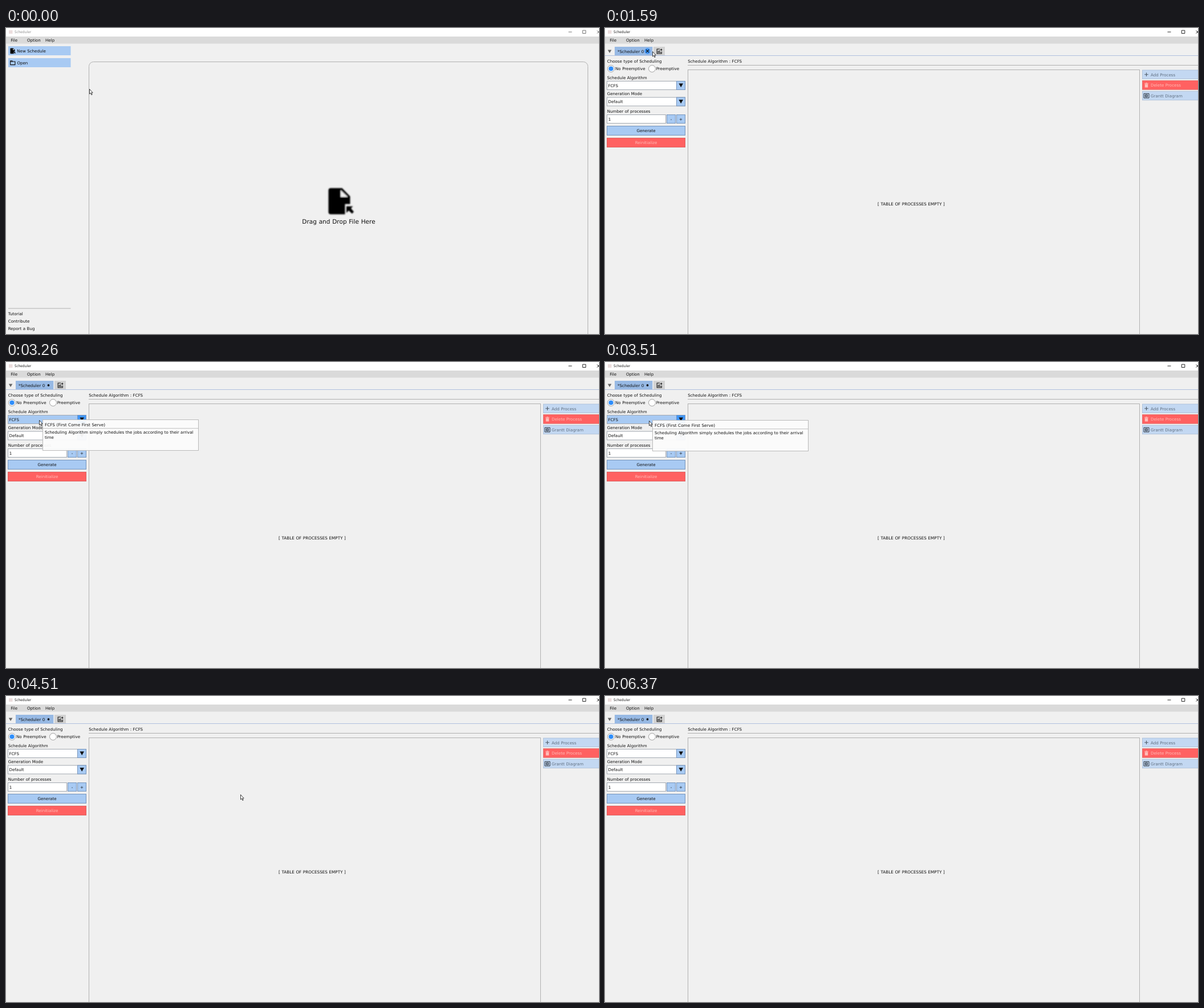
Animation, 1040 px wide and 538 px high, one loop 7.36 s. Source, as an HTML page:

```html
<!DOCTYPE html>
<html lang="en">
<head>
<meta charset="utf-8">
<title>Scheduler</title>
<style>
html, body { margin: 0; width: 100%; height: 100%; overflow: hidden; background: #f0f0f0; }
svg { display: block; width: 1040px; height: 538px; }
text { font-family: "DejaVu Sans", sans-serif; font-size: 7.12px; word-spacing: .034em; text-rendering: geometricPrecision; white-space: pre; }
.title { font-family: "Open Sans", sans-serif; font-size: 6.3px; }
.mid { text-anchor: middle; }
.caps { font-size: 7.25px; }
.note { font-size: 7.05px; }
.big { font-size: 10.55px; }
</style>
</head>
<body>
<svg id="stage" viewBox="0 0 1040 538" xmlns="http://www.w3.org/2000/svg">
  <defs>
    <g id="file">
      <path d="M4 0H24L38 14.5V28H29V46H4Q0 46 0 42V4Q0 0 4 0Z"/>
      <path d="M21.5 3.5V15.5H34Z" fill="#f0f0f0"/>
      <path d="M31.5 32H43L39.5 35.5L44.5 41.5L41.5 45L35.5 39.5L31.5 43.5Z"/>
    </g>
    <filter id="soft"><feGaussianBlur stdDeviation=".8"/></filter>
  </defs>
</svg>
<script>
const LOOP = 7360;
const INK = "#111", BLUE = "#a8caf3", HOT = "#4097fb", EDGE = "#7796bd", RED = "#ff6161", RED_EDGE = "#e06060";
const ROSE = "#ffbdb8", PALE = "#c3d8f2", PALE_EDGE = "#a9bcd4", SLATE = "#617082", LINE = "#b0b0b0", BOX = "#a2a8b0";
const stage = document.getElementById("stage");

function add(parent, tag, attrs, content) {
  const el = document.createElementNS("http://www.w3.org/2000/svg", tag);
  for (const key in attrs) el.setAttribute(key, attrs[key]);
  if (content) el.textContent = content;
  parent.append(el);
  return el;
}
const group = parent => add(parent, "g", {});
const rect = (p, x, y, width, height, fill, stroke = "none", extra = {}) =>
  add(p, "rect", { x, y, width, height, fill, stroke, ...extra });
const path = (p, d, fill = "none", stroke = "none", width = 1) =>
  add(p, "path", { d, fill, stroke, "stroke-width": width });
const text = (p, x, y, str, fill = INK, style = "") => add(p, "text", { x, y, fill, class: style }, str);
const circle = (p, cx, cy, r, fill, stroke = "none", width = 1) =>
  add(p, "circle", { cx, cy, r, fill, stroke, "stroke-width": width });
const fileIcon = (p, transform, extra = {}) => add(p, "use", { href: "#file", transform, ...extra });
const show = (el, on) => el.setAttribute("visibility", on ? "visible" : "hidden");
const move = (el, x, y) => el.setAttribute("transform", `translate(${x} ${y})`);

// Window frame
rect(stage, 0, 0, 1040, 538, "#f0f0f0");
rect(stage, 0, 0, 1040, 15, "#fff");
rect(stage, 0, 15, 1040, 12.5, "#dadada");
rect(stage, 5, 4, 6.5, 6, "#ecdede");
const title = text(stage, 15, 9.2, "Scheduler", "#888", "title");
const controls = path(stage, "M986.5 7H992.5M1011.3 4.2H1016.8V9.5H1011.3ZM1036.5 4.5L1041.5 9.5M1036.5 9.5L1041.5 4.5", "none", "#888", .9);
text(stage, 8.2, 24.2, "File");
text(stage, 37, 24.2, "Option");
text(stage, 69, 24.2, "Help");

// Start page
const home = group(stage);
const newButton = rect(home, 4, 32, 109.5, 16, BLUE);
fileIcon(home, "translate(7.5 35.5) scale(.21)");
text(home, 19.2, 43, "New Schedule");
rect(home, 4, 53, 109.5, 16, BLUE);
path(home, "M7.7 57.7H10.8L12 59H15.9V64.6H7.7ZM7.7 59H15.9", "none", INK, 1.1);
text(home, 19.4, 63.8, "Open");
path(home, "M4 493H113.5", "none", LINE);
["Tutorial", "Contribute", "Report a Bug"].forEach((s, i) => text(home, 3.7, 504.8 + 13.1 * i, s));
rect(home, 145.5, 59.5, 875, 520, "none", LINE, { rx: 8 });
fileIcon(home, "translate(565.5 281.5)", { filter: "url(#soft)" });
text(home, 583.5, 343.5, "Drag and Drop File Here", INK, "mid big");

// Scheduler page
const page = group(stage);
path(page, "M4.8 38.4H11.4L8.1 44Z", "#666");
rect(page, 17, 33, 66.3, 15.5, "#97b9e4");
rect(page, 85, 33, 20, 15.5, "#d2d2d2");
path(page, "M0 48.5H1040", "none", "#b0c0de");
text(page, 22, 43.6, "*Scheduler 0");
path(page, "M96 37H91.2V45H99.2V41.5M93.3 40.5V43.7M95.2 39.2V43.7M97.1 41.8V43.7M96.8 38.3H100.4M98.6 36.5V40.1", "none", INK, 1.1);
const tabDot = circle(page, 74.5, 40.9, 1.9, INK);
const tabClose = group(page);
circle(tabClose, 74.5, 40.6, 5.1, HOT);
path(tabClose, "M71.9 38L77.1 43.2M77.1 38L71.9 43.2", "none", INK, 1.1);

text(page, 3.7, 61, "Choose type of Scheduling");
const radio = circle(page, 10.5, 71.5, 6, "#fff", "#888", .8);
circle(page, 10.5, 71.5, 4.1, "#2f8efb");
text(page, 18, 74.2, "No Preemptive");
circle(page, 82.5, 71.5, 6, "#fff", "#888", .8);
text(page, 89.7, 74.2, "Preemptive");

function combo(label, value, y) {
  text(page, 3.7, y - 4, label);
  const field = rect(page, 3.5, y, 137, 15, "#fff", BOX);
  const button = rect(page, 125.5, y, 15, 15, BLUE, EDGE);
  path(page, `M129.4 ${y + 3.9}H137L133.2 ${y + 10.7}Z`, INK);
  text(page, 5.5, y + 10.1, value);
  return { field, button };
}
const algorithm = combo("Schedule Algorithm", "FCFS", 93.5);
combo("Generation Mode", "Default", 122);

text(page, 3.7, 148.8, "Number of processes");
rect(page, 3.5, 152.5, 103, 15, "#fff", BOX);
text(page, 5.8, 163, "1");
function button(x, y, w, h, label, fill = BLUE, ink = INK, edge = EDGE) {
  rect(page, x, y, w, h, fill, edge);
  text(page, x + w / 2, y + h / 2 + 2.6, label, ink, "mid");
}
button(108.5, 152.5, 15, 15, "-");
button(125.5, 152.5, 15, 15, "+");
button(3.5, 172.5, 137, 16, "Generate");
button(3.5, 193.5, 137, 16, "Reinitialize", RED, ROSE, RED_EDGE);

text(page, 145.2, 61, "Schedule Algorithm : FCFS");
path(page, "M145 65.5H1040", "none", LINE);
rect(page, 145.5, 73.5, 792, 500, "none", LINE);
text(page, 537, 312.2, "[ TABLE OF PROCESSES EMPTY ]", INK, "mid caps");

["Add Process", "Delete Process", "Grantt Diagram"].forEach((label, i) => {
  const y = 74 + 18.6 * i, red = i === 1;
  rect(page, 942.5, y, 110, 15.6, red ? RED : PALE, red ? RED_EDGE : PALE_EDGE, { "stroke-width": .8 });
  text(page, 957, y + 10.5, label, red ? ROSE : SLATE);
});
path(page, "M946.2 81.8H952.8M949.5 78.5V85.1", "none", "#4d5966", 1.1);
path(page, "M946.2 97.3H952.8V98.4H946.2ZM948.3 96.3H950.7V97.3H948.3ZM946.8 99H952.2V104.5H946.8Z", ROSE);
path(page, "M945 115.3H954V123H945ZM947.3 117.3H951.5V121H947.3ZM949.2 117.3V121", "none", "#2b333c");

// Tooltip and pointer
const tip = group(stage);
rect(tip, .5, .5, 273, 54, "#fcfcfc", "#bababa", { "fill-opacity": .95 });
text(tip, 4, 12, "FCFS (First Come First Serve)", INK, "caps");
path(tip, "M1 15.7H273", "none", LINE, .8);
text(tip, 4, 25, "Scheduling Algorithm simply schedules the jobs according to their arrival", INK, "note");
text(tip, 4, 33.7, "time", INK, "note");
const pointer = path(stage, "M.5 .5V9L2.4 7.3L3.9 10.6L5.2 10L3.7 6.8H6.2Z", "#fff", INK, .8);

// The pointer is sampled at a fixed rate along straight legs: step, x, y
const STEP = 136.7, PHASE = 85;
const legs = [
  [-1, 146, 107], [0, 110, 80], [4, 83, 41], [14, 83, 41], [18, 50, 77], [22, 44, 96], [23, 58, 102],
  [28, 106, 104], [30, 169, 115], [32, 411, 173], [35, 724, 180], [39, 778, 158], [42, 739, 46], [45, 1013, 486]
];
function pointerAt(t) {
  const step = Math.min(Math.floor((t - PHASE) / STEP), 45);
  const end = Math.max(1, legs.findIndex(leg => leg[0] >= step));
  const [s0, x0, y0] = legs[end - 1], [s1, x1, y1] = legs[end];
  const k = (step - s0) / (s1 - s0);
  return [Math.round(x0 + (x1 - x0) * k), Math.round(y0 + (y1 - y0) * k)];
}
const within = (t, from, to) => t >= from && t < to;

function draw(t) {
  const opened = t >= 1470;
  show(home, !opened);
  show(page, opened);
  title.setAttribute("fill", opened ? INK : "#888");
  controls.setAttribute("stroke", opened ? INK : "#666");
  newButton.setAttribute("fill", t >= 880 ? HOT : BLUE);

  const closeHot = within(t, 1590, 2300);
  show(tabClose, closeHot);
  show(tabDot, opened && !closeHot);
  radio.setAttribute("fill", within(t, 2450, 2720) ? "#d5e7fc" : "#fff");
  const comboHot = within(t, 2990, 4240);
  algorithm.field.setAttribute("fill", comboHot ? BLUE : "#fff");
  algorithm.button.setAttribute("fill", comboHot ? HOT : BLUE);

  const [x, y] = pointerAt(t);
  move(pointer, x, y);
  show(pointer, t < 6370);
  move(tip, x + (x < 80 ? 6 : 9), y - 1);
  show(tip, within(t, 3110, 4240));
}

const start = performance.now();
function tick() {
  draw((performance.now() - start) % LOOP);
  requestAnimationFrame(tick);
}
tick();
</script>
</body>
</html>
```
